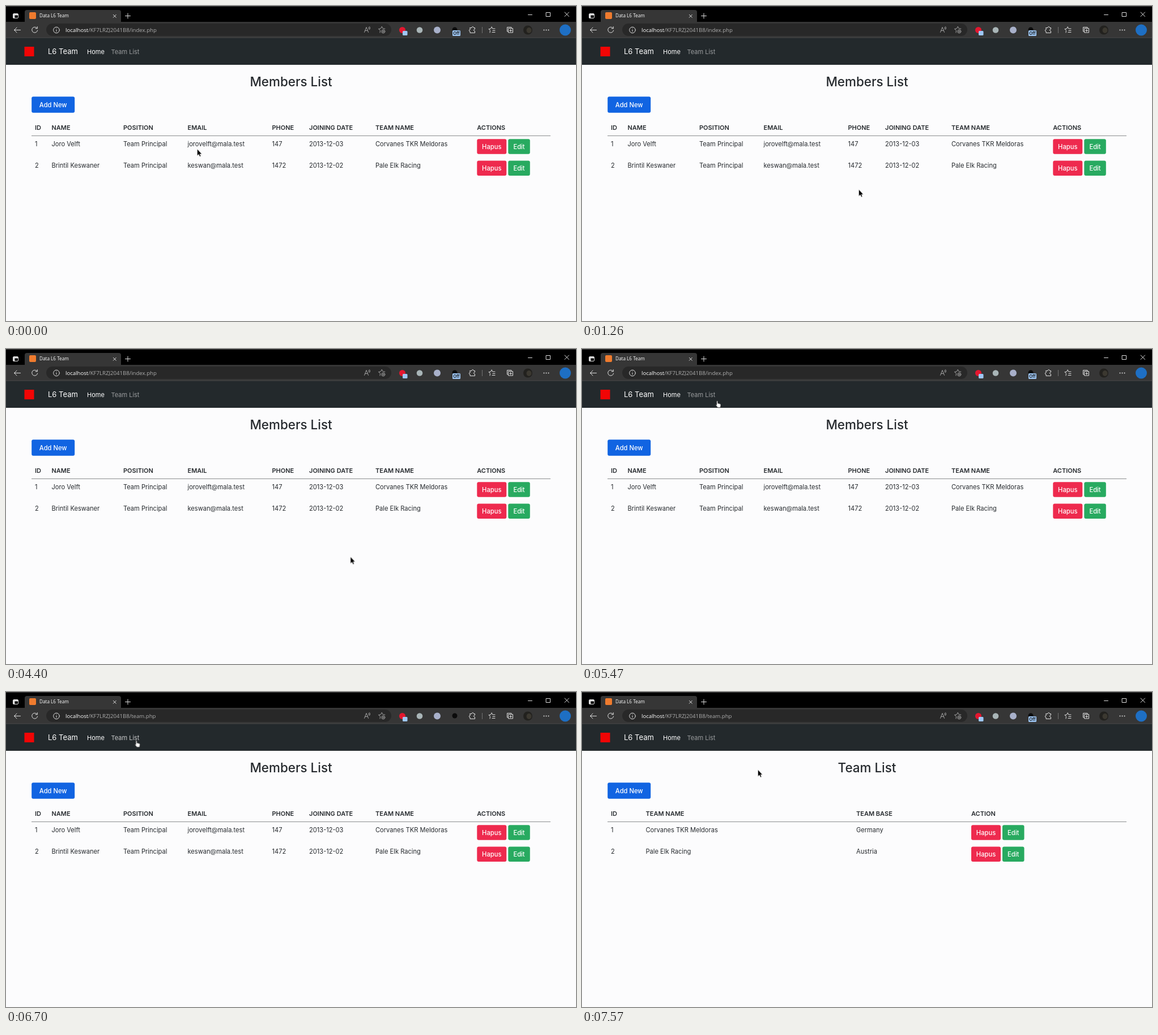
Recreate the animation shown at these times as an HTML page. Size 1006 by 557 pixels, loop 8000 ms.

```html
<!DOCTYPE html>
<html lang="en">
<head>
<meta charset="utf-8">
<title>Data L6 Team</title>
<style>
  html, body { margin: 0; width: 100%; height: 100%; overflow: hidden; background: #fcfcfd; }
  svg { display: block; width: 1006px; height: 557px; }
  text { font: 400 11.1px Inter, sans-serif; fill: #262a2e; white-space: pre; }
  .ui { font-family: "Open Sans", sans-serif; font-size: 9.6px; fill: #adadad; }
  .ui.tab { font-size: 8.2px; fill: #fff; }
  .ui .host { fill: #fff; }
  .brand { font-size: 13px; fill: #fff; }
  .nav { font-size: 11px; fill: #fff; }
  #link { fill: #9a9c9e; }
  .title { font-size: 22.4px; font-weight: 500; text-anchor: middle; }
  .head { font-size: 11px; font-weight: 600; }
  .btn { font-size: 11.2px; font-weight: 500; fill: #fff; text-anchor: middle; }
  .line { fill: none; stroke: #dedede; stroke-width: 1; stroke-linecap: round; stroke-linejoin: round; }
  .dim { stroke: #a2a2a2; }
</style>
</head>
<body>
<svg viewBox="0 0 1006 557">
  <rect width="1006" height="557" fill="#fcfcfd"/>

  <!-- Window frame -->
  <rect width="1006" height="29" fill="#000"/>
  <rect width="1006" height="1" fill="#444"/>
  <path d="M33 29V11q0-4 4-4H199q4 0 4 4V29Z" fill="#363636"/>
  <rect y="28" width="1006" height="28" fill="#363636"/>
  <rect x="71" y="31" width="609" height="22" rx="11" fill="#282828"/>
  <rect x="12.500" y="13.500" width="9" height="8" rx="1.500" class="line"/>
  <path d="M12.500 14h9v2.500h-6v5h-3z" fill="#dedede"/>
  <rect x="41" y="11" width="12" height="12" rx="2" fill="#ef7b2e"/>
  <text class="ui tab" x="59" y="20.300">Data L6 Team</text>
  <path class="line" d="M189.300 15.300l5 5m0-5l-5 5M210.500 17.500h9m-4.500-4.500v9"/>
  <path class="line" d="M921.500 15.500h7M953.500 11.500h7v7h-7zM986 11l7.500 7.500m0-7.500L986 18.500"/>

  <!-- Toolbar -->
  <path class="line" d="M25.500 42.500H14.500m4.500-4.500l-4.500 4.500 4.500 4.500"/>
  <path class="line" d="M55 39.500a5 5 0 1 0 .7 3.500M55.300 36.500v3.300h-3.300"/>
  <circle class="line" cx="89" cy="42.500" r="5.300"/>
  <path class="line" d="M89 42v3M89 39.700v.1"/>
  <text class="ui" x="105" y="45.600"><tspan class="host">localhost</tspan>/KF7LRZJ2041B8/<tspan id="file">index.php</tspan></text>
  <path class="line dim" d="M632.500 46.500l3.500-9 3.500 9M634 43.500h4M640 37.500q1.500 1.500 0 3.500M641.700 36.500q2 2.500 0 5"/>
  <path class="line dim" d="M660 47l.5-3.700-3-2.800 4-.7 1.800-3.600 1.800 3.600 3.700.5"/>
  <circle class="line dim" cx="665.800" cy="45" r="3"/>
  <path class="line dim" d="M664.500 45h2.600m-1.300-1.300v2.600"/>

  <circle cx="699.500" cy="42.500" r="5.500" fill="#e3172f"/>
  <rect x="700" y="44" width="8.500" height="8" rx="1.500" fill="#9ec7f5"/>
  <circle cx="730" cy="42.500" r="5.300" fill="#a9b5b7"/>
  <circle cx="761" cy="42.500" r="6" fill="#a8b0ca"/>
  <circle cx="792" cy="42" r="4.500" fill="#0b0b0b"/>
  <g id="badge">
    <rect x="788" y="43" width="14" height="10" rx="1.500" fill="#9ec7f5"/>
    <text x="795" y="50.800" style="font-size:7.500px;font-weight:600;fill:#111;text-anchor:middle">Off</text>
  </g>
  <path class="line" d="M819 38.500h3q.2-2 1.700-2t1.700 2h2.100v2.500q-2 .1-2 1.700t2 1.700v3.100H819v-2.600q-1.600 0-1.600-1.700t1.600-1.700z"/>
  <path d="M840.500 37v11" stroke="#707070"/>
  <path class="line" d="M854 47l.5-3.700-2.500-2.600 3.500-.5 1.700-3.500 1.700 3.500H863M859 43.500h4M858 46.500h5"/>
  <path class="line" d="M886 45h-1.500v-7.500h7.500v1.500M887 39.500h7.500V47H887zM890.750 41.300v4m-2-2h4"/>
  <circle cx="921" cy="42.500" r="8" fill="#22211e"/>
  <ellipse cx="923" cy="43" rx="4.500" ry="5" fill="#3b3830"/>
  <g fill="#dedede"><circle cx="949.500" cy="42.500" r="1"/><circle cx="953.500" cy="42.500" r="1"/><circle cx="957.500" cy="42.500" r="1"/></g>
  <circle cx="987" cy="42.500" r="10" fill="#1e6fc4"/>

  <!-- Site header -->
  <rect y="56" width="1006" height="48" fill="#23292c"/>
  <rect y="55.500" width="1006" height="1" fill="#4a4a4a"/>
  <rect x="32.500" y="72" width="17" height="17" fill="#f20505"/>
  <text class="brand" x="74" y="85.400">L6 Team</text>
  <text class="nav" x="143" y="85">Home</text>
  <text class="nav" id="link" x="185.500" y="85">Team List</text>

  <!-- Page -->
  <rect x="45.200" y="160.200" width="76" height="28.600" rx="3" fill="#1164e2"/>
  <text class="btn" x="83.200" y="178.700">Add New</text>
  <rect x="45" y="229" width="916" height="1" fill="#8a8c8e"/>
  <g id="members"></g>
  <g id="teams"></g>

  <!-- Pointer -->
  <g id="pointer">
    <path id="arrow" d="M.5 0V11.800L3.200 9.300 5 13.300 6.900 12.500 5.200 8.700H8.600Z" fill="#000" stroke="#fff" stroke-width=".5"/>
    <path id="hand" d="M1.700 1.300q0-1 1-1t1 1V4.500l4 .9q1.500.4 1.300 2L8.300 12H3.500L.4 8.200Q-.3 7 .7 6.700l1 .8Z" fill="#fff" stroke="#111" stroke-width=".6"/>
  </g>
</svg>
<script>
const LOOP = 8000, NS = 'http://www.w3.org/2000/svg';
const $ = id => document.getElementById(id);

function add(parent, tag, attrs, content = '') {
  const el = document.createElementNS(NS, tag);
  for (const k in attrs) el.setAttribute(k, attrs[k]);
  el.textContent = content;
  parent.append(el);
}

function button(parent, x, y, w, fill, label) {
  add(parent, 'rect', { x, y, width: w, height: 26.5, rx: 3, fill });
  add(parent, 'text', { x: x + w / 2, y: y + 17.3, class: 'btn' }, label);
}

function table(id, title, cols, heads, rows) {
  const g = $(id), actions = cols[cols.length - 1];
  add(g, 'text', { x: 503, y: 142.3, class: 'title' }, title);
  heads.forEach((h, i) => add(g, 'text', { x: cols[i], y: 218.6, class: 'head' }, h));
  rows.forEach((row, r) => {
    const y = 247.8 + r * 38.4;
    row.forEach((cell, i) => add(g, 'text', { x: cols[i], y }, cell));
    button(g, actions, y - 12.6, 52, '#ee2a4e', 'Hapus');
    button(g, actions + 55, y - 12.6, 38.5, '#28aa60', 'Edit');
  });
}

table('members', 'Members List', [51, 80.5, 207, 320.5, 469.5, 535, 652, 831.3],
  ['ID', 'NAME', 'POSITION', 'EMAIL', 'PHONE', 'JOINING DATE', 'TEAM NAME', 'ACTIONS'],
  [['1', 'Joro Velft', 'Team Principal', 'jorovelft@mala.test', '147', '2013-12-03', 'Corvanes TKR Meldoras'],
   ['2', 'Brintil Keswaner', 'Team Principal', 'keswan@mala.test', '1472', '2013-12-02', 'Pale Elk Racing']]);
table('teams', 'Team List', [51, 112.5, 484, 687],
  ['ID', 'TEAM NAME', 'TEAM BASE', 'ACTION'],
  [['1', 'Corvanes TKR Meldoras', 'Germany'], ['2', 'Pale Elk Racing', 'Austria']]);

// steps: [time, value]; each value holds until the next time
function hold(el, prop, steps) {
  const frames = steps.map(([t, v]) => ({ offset: t / LOOP, [prop]: v, easing: 'steps(1, end)' }));
  frames.push({ offset: 1, [prop]: steps[steps.length - 1][1] });
  el.animate(frames, { duration: LOOP, iterations: Infinity });
}

// first change, last change, number of changes, end x, end y
const moves = [
  [30, 160, 5, 488, 324.5],
  [1298, 1298, 1, 608, 365],
  [2070, 2230, 5, 520, 242],
  [2400, 2530, 3, 531, 265],
  [2868, 2928, 3, 543, 332.5],
  [3370, 3670, 8, 592, 364],
  [4398, 4398, 1, 607.5, 367.5],
  [4670, 4670, 1, 582, 360],
  [4940, 4970, 2, 471, 306],
  [5300, 5468, 6, 236, 91.5],
  [5538, 5538, 1, 227.5, 85.5],
  [7540, 7568, 2, 310, 137.5]
];
const at = (x, y) => `translate(${x}px, ${y}px)`;
let px = 337, py = 253;
const path = [[0, at(px, py)]];
for (const [from, to, n, x, y] of moves) {
  for (let i = 1; i <= n; i++) {
    const p = i / n, e = p * p * (3 - 2 * p);
    const t = n > 1 ? from + (to - from) * (i - 1) / (n - 1) : from;
    path.push([t, at(px + (x - px) * e, py + (y - py) * e)]);
  }
  px = x; py = y;
}
hold($('pointer'), 'transform', path);
hold($('hand'), 'opacity', [[0, 0], [5434, 1], [7540, 0]]);
hold($('arrow'), 'opacity', [[0, 1], [5434, 0], [7540, 1]]);
hold($('link'), 'fill', [[0, '#9a9c9e'], [5500, '#b2b4b5'], [5538, '#c8c9ca'], [7540, '#b2b4b5'], [7568, '#9a9c9e']]);
hold($('members'), 'opacity', [[0, 1], [6768, 0]]);
hold($('teams'), 'opacity', [[0, 0], [6768, 1]]);
hold($('badge'), 'opacity', [[0, 1], [6600, 0], [7100, 1]]);

const start = performance.now();
function tick(now) {
  const t = Math.max(0, now - start) % LOOP;
  $('file').textContent = t < 6600 ? 'index.php' : 'team.php';
  requestAnimationFrame(tick);
}
requestAnimationFrame(tick);
</script>
</body>
</html>
```
